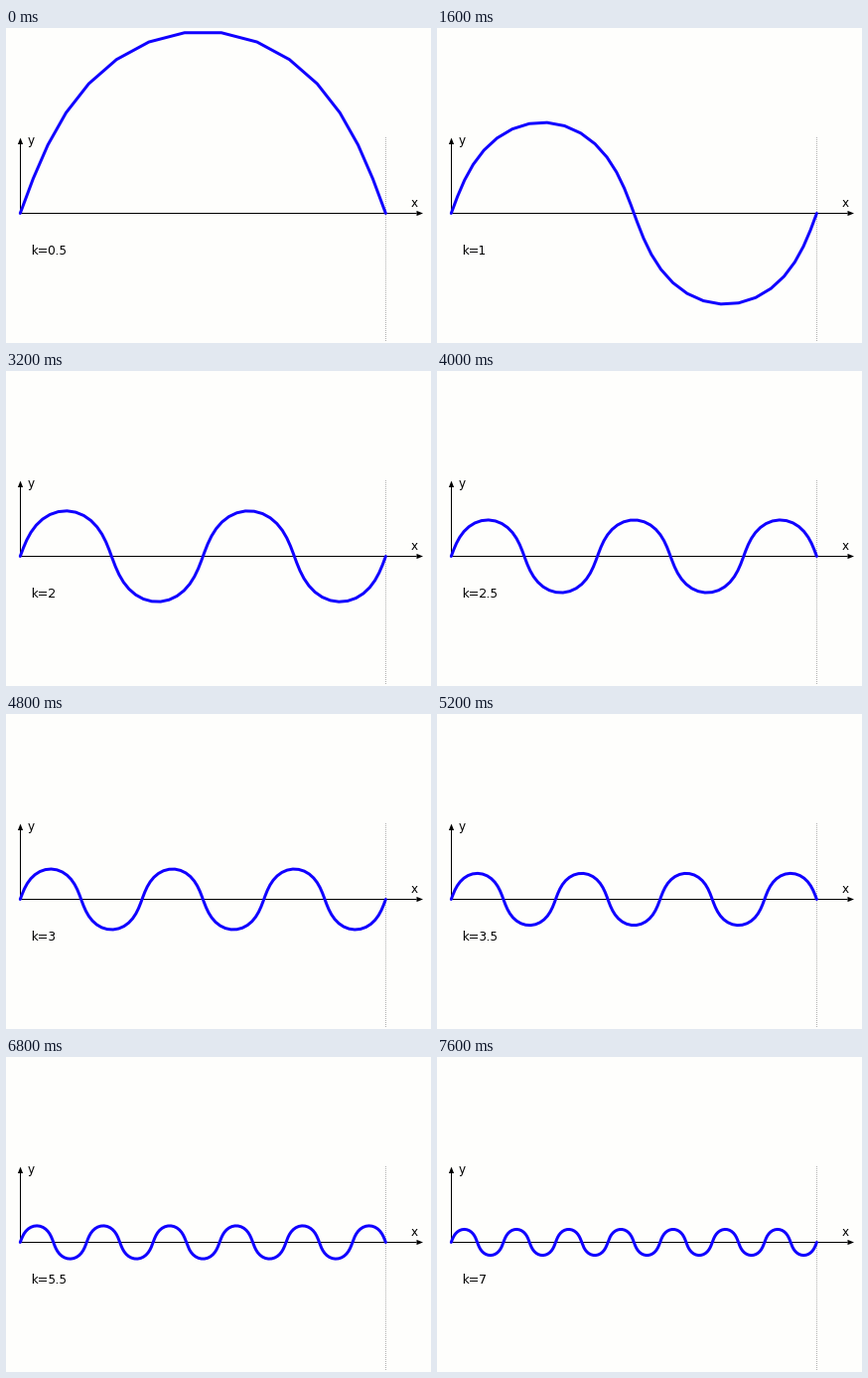
Animation, 428 px wide and 317 px high, one loop 8000 ms. Source, as a matplotlib script:

```python
import numpy as np
import matplotlib.pyplot as plt
from matplotlib.animation import FuncAnimation

W, H, DPI = 428, 317, 100
PX = 72 / DPI                      # one pixel in points
X0, X1, Y0 = 14.3, 382.4, 186.5    # start, end and height of the curve
OMEGA = np.radians(70)             # steepest angle of the meander
INTERVAL = 400

# Wave counts: a pause on the first one, then ever larger steps
WAVES = np.concatenate([[0.5, 0.5], np.arange(0.5, 3, 0.25),
                        np.arange(3, 6.5, 0.5), [7]])

plt.rcParams.update({
    "font.family": "DejaVu Sans",
    "text.hinting_factor": 1,      # whole-pixel letter spacing
    "path.snap": False,            # keep lines on their pixel centres
})


def meander(k):
    """Sine-generated curve with k waves, sampled at equal arc lengths."""
    sub = 40
    n = int(32 * k) - 1
    s = (np.arange(n * sub) + 0.5) / (n * sub)
    angle = OMEGA * np.cos(2 * np.pi * k * s)
    x = np.append(0, np.cumsum(np.cos(angle)))
    y = np.append(0, np.cumsum(np.sin(angle)))
    scale = (X1 - X0) / x[-1]
    return X0 + scale * x[::sub], Y0 - scale * y[::sub]


fig = plt.figure(figsize=(W / DPI, H / DPI), dpi=DPI, facecolor="#fefefc")
ax = fig.add_axes([0, 0, 1, 1])
ax.set_xlim(0, W)
ax.set_ylim(H, 0)
ax.axis("off")


def label(x, y, text):
    return ax.text(x, y, text, fontsize=12 * PX, color="black",
                   ha="left", va="baseline")


def arrow(x, y, dx, dy, length=6.5, half=2.6):
    """Axis from (x, y) along (dx, dy) with a filled head."""
    tx, ty = x + dx, y + dy
    size = np.hypot(dx, dy)
    ux, uy = dx / size, dy / size
    bx, by = tx - length * ux, ty - length * uy
    ax.plot([x, bx], [y, by], color="black", lw=PX,
            solid_capstyle="butt", zorder=2)
    ax.fill([tx, bx - half * uy, bx + half * uy],
            [ty, by + half * ux, by - half * ux],
            color="black", lw=0, zorder=2)


ax.plot([382.5, 382.5], [110, 315], color="#b0b0b0", lw=PX,
        ls=(0, (1, 1)), dash_capstyle="butt", zorder=1)
arrow(14.5, Y0, 405.5, 0)
arrow(14.5, Y0, 0, -76)
label(407.5, 180, "x")
label(21.7, 117, "y")

wave_label = label(25.5, 228.5, "")
curve, = ax.plot([], [], color="#1000ff", lw=3 * PX, zorder=3,
                 solid_capstyle="round", solid_joinstyle="round")


def update(i):
    k = WAVES[i]
    curve.set_data(*meander(k))
    wave_label.set_text(f"k={k:g}")
    return curve, wave_label


anim = FuncAnimation(fig, update, frames=len(WAVES), interval=INTERVAL,
                     repeat=True, repeat_delay=0)
plt.show()
```
